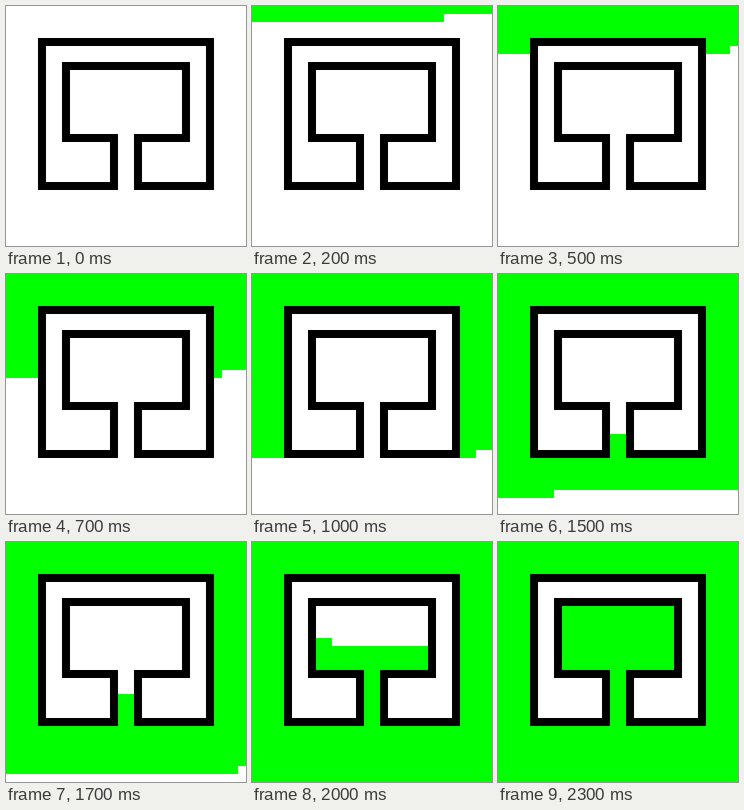
An HTML page with a canvas for the animation above (2800 ms loop, 300x300 px).

```html
<!DOCTYPE html>
<html lang="en">
<head>
<meta charset="utf-8">
<title>Flood fill</title>
<style>
  html, body { margin: 0; width: 100%; height: 100%; overflow: hidden; background: #fff; }
  canvas { display: block; }
</style>
</head>
<body>
<canvas id="stage" width="300" height="300"></canvas>
<script>
const CELL = 10, GRID = 30;
const STEP_MS = 100, LOOP_MS = 2800, CELLS_PER_STEP = 27, LAST_STEP = 23;

const ctx = document.getElementById('stage').getContext('2d');
const wall = new Path2D('M135 225H45V45H255V225H165V165H225V75H75V165H135Z');
ctx.lineWidth = CELL;

// Span fill with a first-in, first-out queue; returns the cells in fill order.
function floodOrder() {
  const filled = new Set(), order = [], queue = [[0, 0]];
  const isOpen = (x, y) =>
    x >= 0 && y >= 0 && x < GRID && y < GRID &&
    !filled.has(y * GRID + x) &&
    !ctx.isPointInStroke(wall, (x + 0.5) * CELL, (y + 0.5) * CELL);

  while (queue.length) {
    let [x, y] = queue.shift();
    if (!isOpen(x, y)) continue;
    while (isOpen(x - 1, y)) x--;
    for (; isOpen(x, y); x++) {
      filled.add(y * GRID + x);
      order.push([x, y]);
      for (const ny of [y - 1, y + 1]) {
        if (isOpen(x, ny)) queue.push([x, ny]);
      }
    }
  }
  return order;
}

const order = floodOrder();

function draw() {
  const time = performance.now() % LOOP_MS;
  const step = Math.min(Math.floor(time / STEP_MS), LAST_STEP);
  ctx.fillStyle = '#fff';
  ctx.fillRect(0, 0, 300, 300);
  ctx.fillStyle = '#0f0';
  for (const [x, y] of order.slice(0, step * CELLS_PER_STEP)) {
    ctx.fillRect(x * CELL, y * CELL, CELL, CELL);
  }
  ctx.stroke(wall);
  requestAnimationFrame(draw);
}
draw();
</script>
</body>
</html>
```
